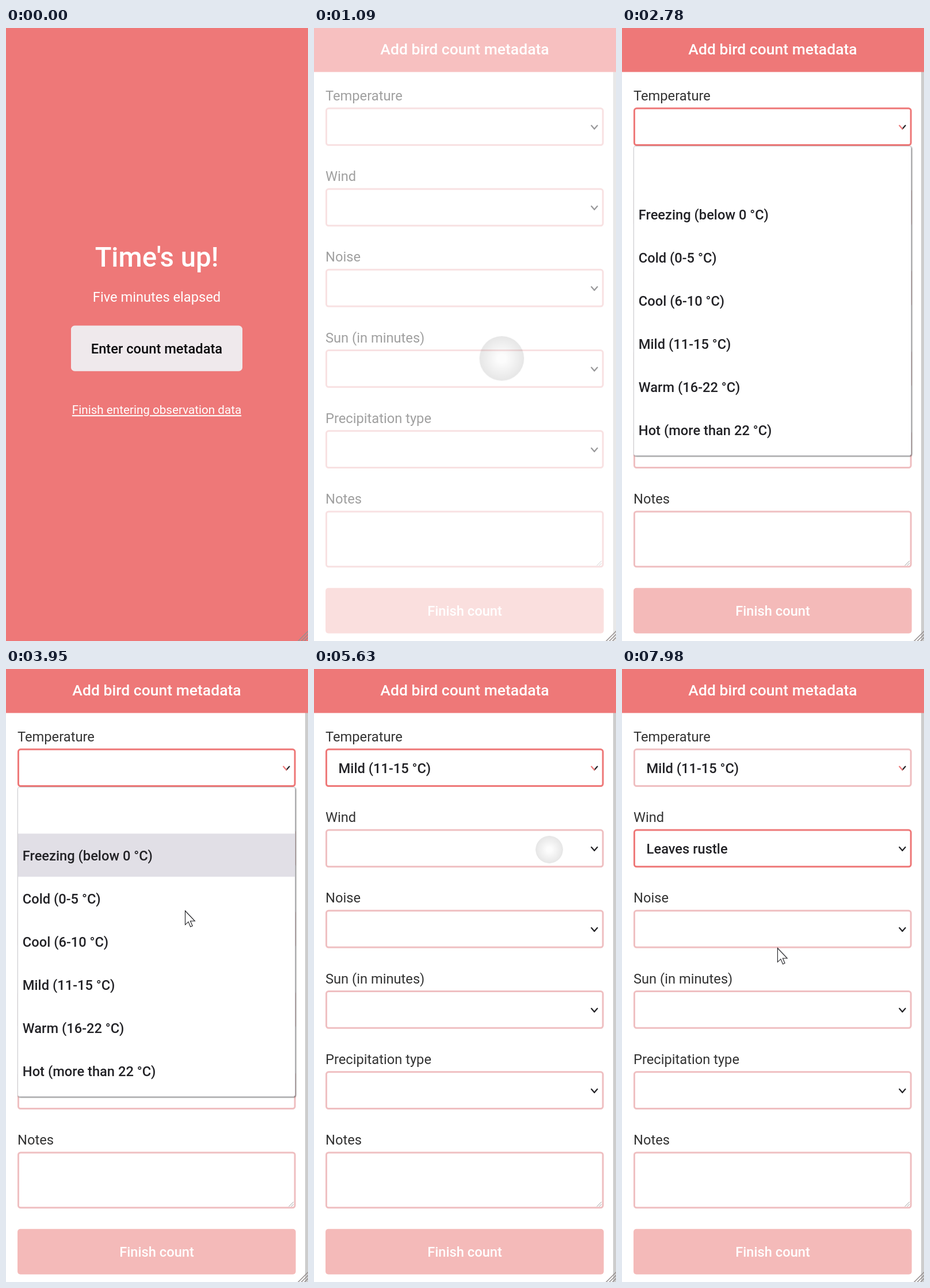
An HTML page that plays this animation: 525x1066 px, repeating every 8 s.

```html
<!DOCTYPE html>
<html lang="en">
<head>
<meta charset="utf-8">
<title>Bird count</title>
<style>
html, body { margin: 0; width: 100%; height: 100%; overflow: hidden; background: #fff; }
svg { display: block; width: 100vw; height: 100vh; font: 400 23.7px Roboto, sans-serif; }
.bold { font-weight: 500; }
.mid { text-anchor: middle; }
.line { fill: none; stroke-linecap: round; stroke-linejoin: round; }
.field { fill: #fff; stroke: #efbfc1; stroke-width: 3; }
.popup { filter: drop-shadow(1.5px 1.5px 1px rgba(0, 0, 0, .6)); }
</style>
</head>
<body>
<svg id="stage" viewBox="0 0 525 1066"></svg>
<script>
const LOOP = 8000;
const RED = '#ee7878', PINK = '#efbfc1', INK = '#222226';
const OPEN = [2720, 5720], CLOSE = [4500, 7440];
const ROW = 75.1;

const text = (x, y, str, attrs = '') => `<text x="${x}" y="${y}" ${attrs}>${str}</text>`;
const box = (x, y, w, h, r, attrs) =>
  `<rect x="${x}" y="${y}" width="${w}" height="${h}" rx="${r}" ${attrs}/>`;

function select(label, i) {
  const y = 140.25 * i;
  return text(20, 125.8 + y, label, 'fill="#333"') +
    box(21.4, 139.8 + y, 480.8, 63.8, 4, `class="field" id="field${i}"`) +
    `<g class="line" stroke="${INK}" stroke-width="2.2" transform="translate(487.4 ${172 + y})">
      <path d="M0 3.4L5.2 -2.4"/><path id="tick${i}" d="M-5.2 -2.4L0 3.4"/></g>`;
}

function popup(id, y, h, firstLine, options) {
  return `<g id="popup${id}"><g class="popup">${box(20.5, y, 482, h, 3, 'fill="#fff" stroke="#cfcfd4"')}</g>
    <rect id="hover${id}" x="21" width="481" height="75" fill="#e1dfe6"/>` +
    options.map((s, i) => text(28.8, firstLine + i * ROW, s, `class="bold" fill="${INK}"`)).join('') + '</g>';
}

const labels = ['Temperature', 'Wind', 'Noise', 'Sun (in minutes)', 'Precipitation type'];
const temps = ['Freezing (below 0 °C)', 'Cold (0-5 °C)', 'Cool (6-10 °C)',
  'Mild (11-15 °C)', 'Warm (16-22 °C)', 'Hot (more than 22 °C)'];
const winds = ['Leaves still or move without noise', 'Leaves rustle',
  'Leaves and branches in constant motion', 'Branches or trees sway'];

document.getElementById('stage').innerHTML = `
<defs><radialGradient id="press">
  <stop offset=".15" stop-opacity=".01"/><stop offset="1" stop-opacity=".1"/>
</radialGradient></defs>
<g id="intro">
  <rect width="525" height="1066" fill="${RED}"/>
  ${text(262, 414.5, "Time's up!", 'class="bold mid" font-size="47.3" fill="#fff"')}
  ${text(262, 475.6, 'Five minutes elapsed', 'class="mid" fill="#fff"')}
  ${box(113, 517.5, 298, 79.2, 6.5, 'fill="#efe9ec"')}
  ${text(262, 566.3, 'Enter count metadata', 'class="bold mid" fill="#0b0b0d"')}
  ${text(262, 671.2, 'Finish entering observation data',
    'class="mid" font-size="20.65" fill="#fff" text-decoration="underline"')}
</g>
<g id="form">
  <rect width="525" height="1066" fill="#fff"/>
  <rect x="520" y="76" width="5" height="990" fill="#cdcdcd"/>
  <rect width="525" height="76.5" fill="${RED}"/>
  ${text(262, 46.3, 'Add bird count metadata', 'class="bold mid" font-size="26.5" fill="#fff"')}
  ${labels.map(select).join('')}
  ${text(42.6, 180.8, temps[3], `id="value0" class="bold" fill="${INK}"`)}
  ${text(42.6, 321.2, winds[1], `id="value1" class="bold" fill="${INK}"`)}
  ${text(20, 827.1, 'Notes', 'fill="#333"')}
  ${box(21.4, 841, 480.8, 95.8, 4, 'class="field"')}
  <path class="line" stroke="#9a9a9a" d="M492 934.5L499.5 927M496 934.5L499.5 931"/>
  ${box(20, 973.7, 483.7, 79, 5, 'fill="#f4bab9"')}
  ${text(262, 1022.3, 'Finish count', 'class="bold mid" fill="#fff"')}
</g>
<circle id="ripple" r="39" fill="url(#press)"/>
${popup(0, 205.5, 538, 332.8, temps)}
${popup(1, 345.5, 388, 473.2, winds)}
<path class="line" stroke="#969090" stroke-width="1.6" d="M508 1066L525 1049M513.5 1066L525 1054.5M519 1066L525 1060"/>
<path id="cursor" fill="#fff" stroke="#1c1c20" stroke-width="1.1"
  d="M.5 .5V24.8L6 19.6L9.7 28.2L13.2 26.7L9.5 18.3H17.3Z"/>`;

// Rows are [time, properties, easing towards the next row].
function play(id, rows, easing = 'linear') {
  const frames = rows.map(([t, props, ease]) => ({ ...props, offset: t / LOOP, easing: ease || easing }));
  const last = frames[frames.length - 1];
  if (last.offset < 1) frames.push({ ...last, offset: 1 });
  document.getElementById(id).animate(frames, { duration: LOOP, iterations: Infinity });
}
const hard = (id, prop, rows) => play(id, rows.map(([t, v]) => [t, { [prop]: v }]), 'step-end');
const fade = (id, rows) => play(id, rows.map(([t, v]) => [t, { opacity: v }]));
const at = (x, y, scale = 1) => ({ transform: `translate(${x}px, ${y}px) scale(${scale})` });

fade('intro', [[0, 1], [930, 1], [1040, 0]]);
fade('form', [[0, 0], [1040, 0], [1150, 1]]);

play('cursor', [
  [0, at(324, 578)],
  [1953, at(324, 578), 'ease'], [2320, at(453, 164)],
  [3724, at(453, 164), 'ease'], [4304, at(241, 546)],
  [5070, at(241, 546), 'ease'], [5520, at(408, 313)],
  [6846, at(408, 313), 'ease'], [7296, at(195, 547)],
  [7805, at(195, 547), 'cubic-bezier(.37, .09, .5, .62)'], [8000, at(276.4, 479.4)]
]);
hard('cursor', 'opacity', [[0, 0], [500, 1], [890, 0], [1985, 1], [2590, 0],
  [3755, 1], [5590, 0], [6875, 1]]);

const presses = [[890, 324, 578, 1145], [2590, 453, 164, 2775], [5590, 408, 313, 5775]];
play('ripple', [[0, at(325, 579, .5)], ...presses.flatMap(([t, x, y]) =>
  [[t, at(x + 1, y + 1, .5)], [t + 185, at(x + 1, y + 1)]])]);
hard('ripple', 'opacity', [[0, 0], ...presses.flatMap(p => [[p[0], 1], [p[3], 0]])]);

OPEN.forEach((t, i) => {
  hard('popup' + i, 'opacity', [[0, 0], [t, 1], [CLOSE[i], 0]]);
  hard('value' + i, 'opacity', [[0, 0], [CLOSE[i], 1]]);
});
hard('field0', 'stroke', [[0, PINK], [OPEN[0], RED], [OPEN[1], PINK]]);
hard('field1', 'stroke', [[0, PINK], [OPEN[1], RED]]);
hard('tick0', 'stroke', [[0, INK], [OPEN[0], RED]]);

// The highlight trails the pointer by a moment.
function hover(id, top, times) {
  hard('hover' + id, 'opacity', [[0, 0], [times[0], 1]]);
  hard('hover' + id, 'transform', [[0, `translateY(${top}px)`],
    ...times.map((t, i) => [t, `translateY(${top + i * ROW}px)`])]);
}
hover(0, 211.2, [3855, 3910, 3963, 4030, 4157]);
hover(1, 351.6, [6974, 7041, 7138]);
</script>
</body>
</html>
```
